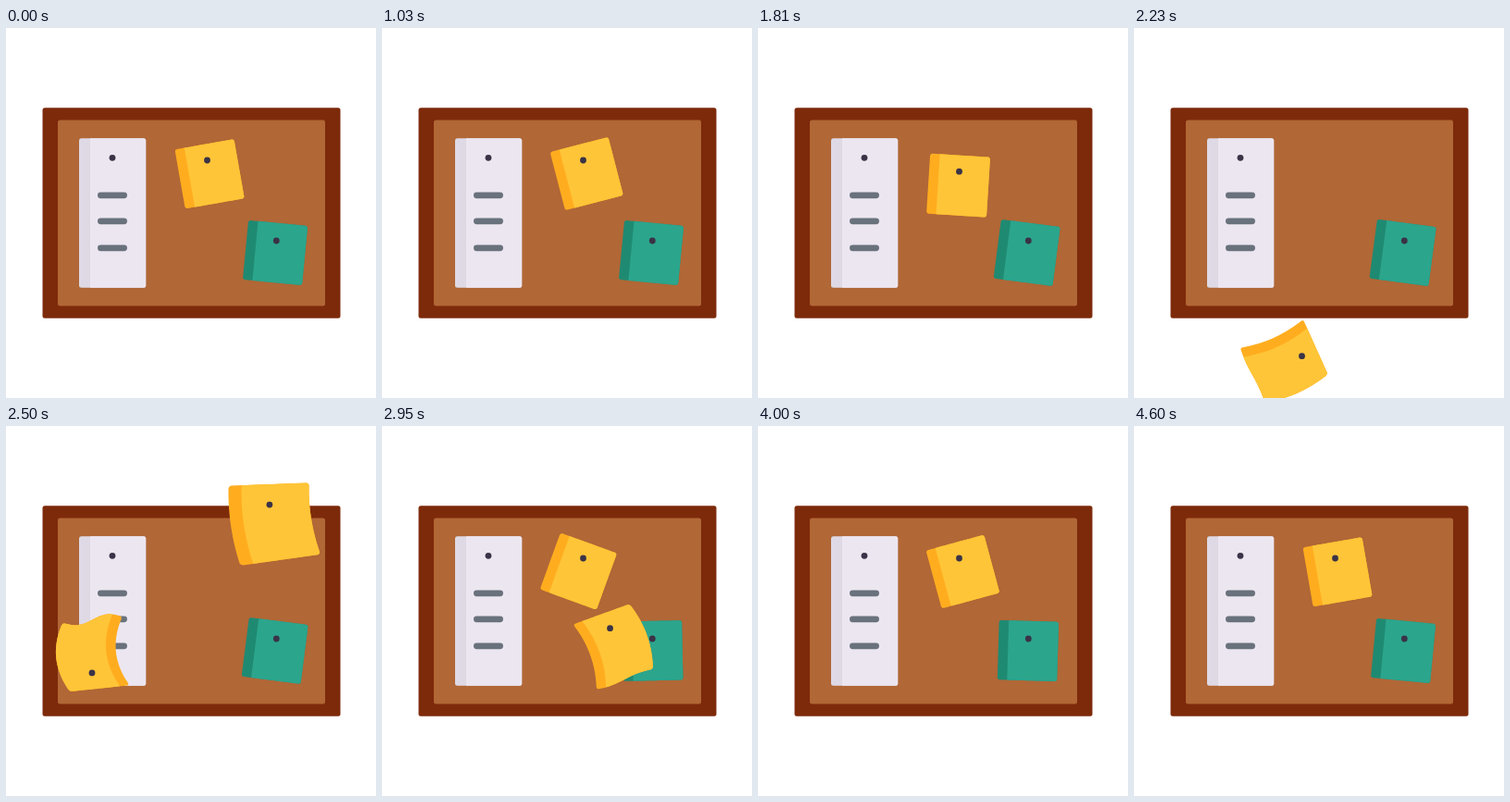
Recreate the animation shown at these times as an HTML page with a canvas. Size 400 by 400 pixels, loop 4630 ms.

```html
<!DOCTYPE html>
<html lang="en">
<head>
<meta charset="utf-8">
<title>Pinboard</title>
<style>
html, body { margin: 0; width: 100%; height: 100%; overflow: hidden; background: #fff; }
canvas { display: block; width: 400px; height: 400px; }
</style>
</head>
<body>
<canvas id="stage"></canvas>
<script>
const LOOP = 4630, HOLD = 1030, STEP = 30;
const YELLOW = ['#ffc538', '#ffad1f'], GREEN = ['#2ca58d', '#1f8a72'];
const PIN = '#3a3347';
const HOME = { x: 217.5, y: 143 };
const { PI, sin, cos, exp, min, max } = Math;

const canvas = document.getElementById('stage');
const ctx = canvas.getContext('2d');
const ratio = window.devicePixelRatio || 1;
canvas.width = canvas.height = 400 * ratio;

const rad = deg => deg * PI / 180;
const clamp = v => max(0, min(1, v));
const smooth = (from, to, t) => {
  const u = clamp((t - from) / (to - from));
  return u * u * (3 - 2 * u);
};

function box(x, y, w, h, r, color) {
  ctx.fillStyle = color;
  ctx.beginPath();
  ctx.roundRect(x, y, w, h, r);
  ctx.fill();
}

function dot(x, y) {
  ctx.fillStyle = PIN;
  ctx.beginPath();
  ctx.arc(x, y, 3.4, 0, 2 * PI);
  ctx.fill();
}

// Rounded rectangle as points, so that it can be bent.
function outline(x0, y0, x1, y1, rl, rr) {
  const corners = [
    [x0 + rl, y0 + rl, rl], [x1 - rr, y0 + rr, rr],
    [x1 - rr, y1 - rr, rr], [x0 + rl, y1 - rl, rl]
  ];
  const arcs = corners.map(([cx, cy, r], i) => Array.from({ length: 5 }, (_, k) => {
    const a = PI * (1 + i / 2 + k / 8);
    return [cx + r * cos(a), cy + r * sin(a)];
  }));
  return arcs.flatMap((arc, i) => {
    const [ax, ay] = arc[4], [bx, by] = arcs[(i + 1) % 4][0];
    const side = Array.from({ length: 14 }, (_, k) =>
      [ax + (bx - ax) * (k + 1) / 15, ay + (by - ay) * (k + 1) / 15]);
    return [...arc, ...side];
  });
}

// A note hangs from its pin at x, y; bulge and skew bend the paper below it.
function note(x, y, angle, colors, { size = 65, top = 17.5, scale = 1, bulge = 0, skew = 0 } = {}) {
  const half = size / 2;
  const stretch = 1 + 0.15 * clamp(bulge / 5);
  const warp = ([px, py]) => {
    const v = (py + top) / size, bow = 4 * v * (1 - v);
    return [
      px + bulge * (bow - 0.6) + skew * (v - 0.4 * bow),
      size * v * stretch - top - 0.5 * skew * v * px / half
        - 0.035 * bulge * bulge * v * sin(PI * px / half)
    ];
  };
  const sheet = (left, radius, color) => {
    ctx.fillStyle = color;
    ctx.beginPath();
    outline(left, -top, half, size - top, radius, 2.5).forEach(p => ctx.lineTo(...warp(p)));
    ctx.fill();
  };
  ctx.save();
  ctx.translate(x, y);
  ctx.rotate(rad(angle));
  ctx.scale(scale, scale * (1 - 0.008 * skew));
  sheet(-half, 2.5, colors[1]);
  sheet(-half + 10.5, 0, colors[0]);
  ctx.restore();
  dot(x, y);
}

function board() {
  box(39.5, 86.2, 322, 227.5, 2.5, '#7d2a0b');
  box(56, 99.5, 289, 201, 2.5, '#b16736');
  box(79, 119.3, 72.2, 161.5, 2.5, '#dfd9e6');
  box(91, 119.3, 60.2, 161.5, [0, 2.5, 2.5, 0], '#ece6f0');
  for (const y of [181, 209, 238]) box(99, y - 3.5, 32, 6.7, 3.35, '#69727c');
  dot(115, 140.3);
}

// Sways gently, then is pushed aside by the passing note.
function greenNote(t) {
  const breeze = 2.1 * sin(PI * clamp((t - HOLD) / 2200));
  const push = 7.6 * (smooth(2500, 2970, t) - smooth(3500, 4500, t));
  note(292.3, 230, 5.5 + breeze - push, GREEN, { size: 64.4, top: 19.2 });
}

// Swings loose, drops, flies one loop and falls off the stage.
function leavingNote(t) {
  const dive = 2073, exit = 3008, gravity = 7.33e-4;
  const u = max(0, t - 1000);
  if (t < dive) {
    const angle = -18.5 * exp(-u / 560) * cos(0.0136 * u - 1);
    note(HOME.x, HOME.y + gravity * max(0, t - 1681) ** 2, angle, YELLOW);
    return;
  }
  const s = min(t, exit) - 2500, late = max(0, t - exit);
  const turn = 174 + 0.389 * s - 4.4e-5 * s * s;
  const x = 163 + 0.0385 * s + 70.4 * cos(rad(turn));
  const y = 255.6 + 108.6 * sin(rad(turn)) + 0.65 * late + gravity * late * late;
  note(x, y, turn, YELLOW, { bulge: 11.5 * sin(PI * clamp((t - dive) / 1076)) });
}

// Flies in from the right towards the board, then swings to rest.
function arrivingNote(t) {
  const far = max(0, (2690 - t) / 430);
  const late = t - 2950;
  const angle = -10 + 30 * cos(0.0029 * late) * exp(-max(0, late) / 600);
  note(HOME.x + 268 * far ** 1.69, HOME.y - 131 * far, angle, YELLOW,
    { scale: 1 + 0.77 * far, skew: 16 * far });
}

function draw(t) {
  ctx.setTransform(ratio, 0, 0, ratio, 0, 0);
  ctx.fillStyle = '#fff';
  ctx.fillRect(0, 0, 400, 400);
  board();
  greenNote(t);
  if (t > 2260) arrivingNote(t);
  if (t < 3300) leavingNote(t);
}

const start = performance.now();
function tick() {
  const t = max(0, performance.now() - start) % LOOP;
  draw(t < HOLD ? 0 : HOLD + STEP * Math.floor((t - HOLD) / STEP));
  requestAnimationFrame(tick);
}
tick();
</script>
</body>
</html>
```
